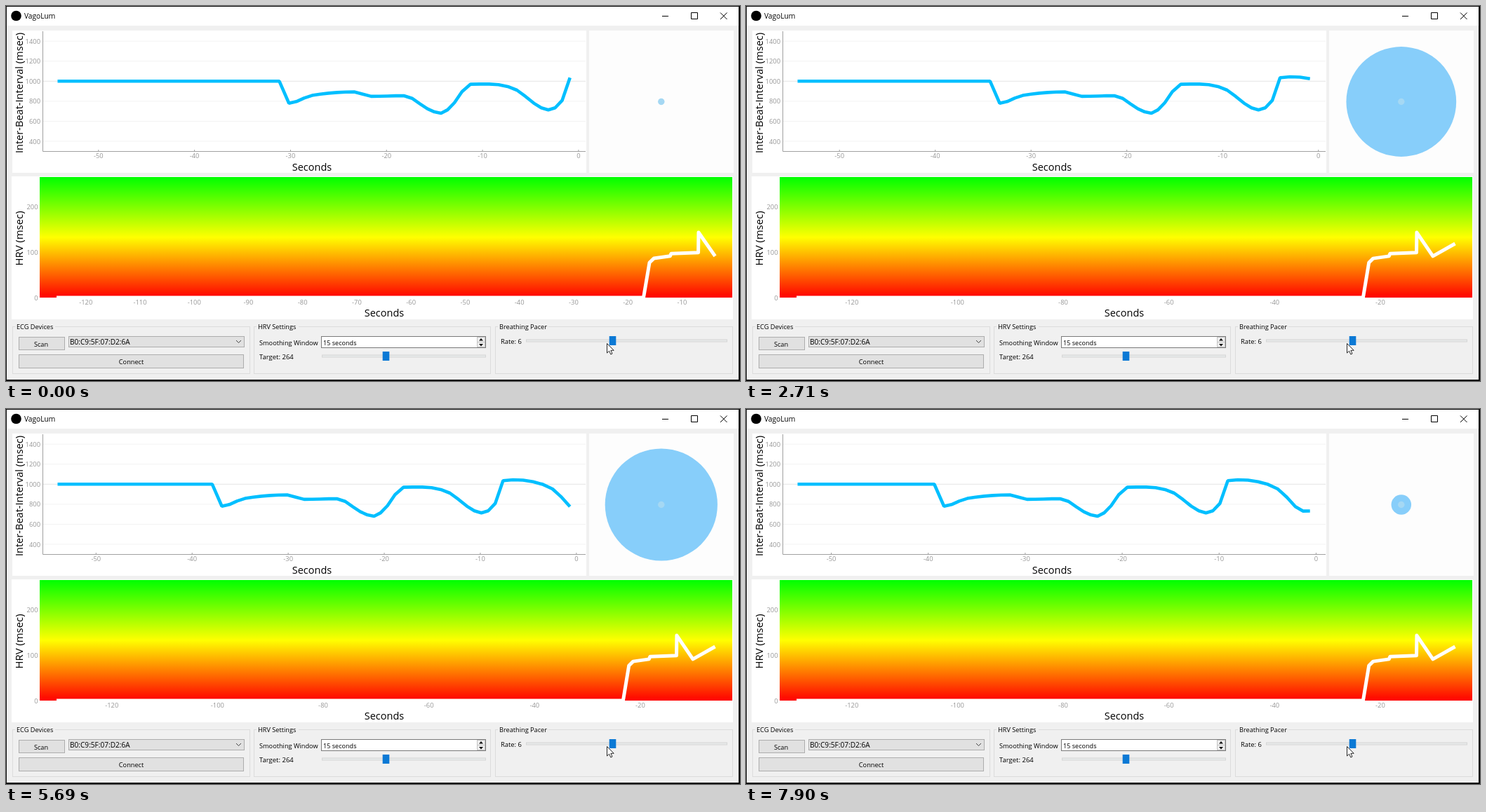
Write an HTML page that moves like this. It is 1046 px wide and 535 px high and loops after 8 s.

```html
<!DOCTYPE html>
<html lang="en">
<head>
<meta charset="utf-8">
<title>Breathing pacer</title>
<style>
  html, body { margin: 0; width: 100%; height: 100%; overflow: hidden; background: #000; }
  svg { display: block; width: 1046px; height: 535px; font-family: "Open Sans", "Noto Sans", sans-serif; }
  text { white-space: pre; }
</style>
</head>
<body>
<svg id="stage" viewBox="0 0 1046 535">
  <defs>
    <linearGradient id="zones" x1="0" y1="0" x2="0" y2="1">
      <stop offset="0" stop-color="#0f0"/>
      <stop offset=".5" stop-color="#ff0"/>
      <stop offset="1" stop-color="#f00"/>
    </linearGradient>
    <clipPath id="hrvClip"><rect x="48" y="244" width="987" height="172"/></clipPath>
  </defs>
</svg>
<script>
const stage = document.getElementById("stage");
const LOOP = 8000;

function add(tag, attrs, parent = stage) {
  const node = document.createElementNS("http://www.w3.org/2000/svg", tag);
  for (const key in attrs) node.setAttribute(key, attrs[key]);
  return parent.appendChild(node);
}
const rect = (x, y, width, height, fill, stroke = "none") =>
  add("rect", { x, y, width, height, fill, stroke });
const path = (d, stroke, width = 1, more = {}) =>
  add("path", { d, stroke, "stroke-width": width, fill: "none", ...more });
function label(str, x, y, size = 9.2, more = {}, parent = stage) {
  const node = add("text", { x, y, "font-size": size, fill: "#000", ...more }, parent);
  node.textContent = str;
  return node;
}
const middle = { "text-anchor": "middle" };
const tick = { fill: "#969696", "text-anchor": "middle" };
const tickEnd = { fill: "#969696", "text-anchor": "end" };
const polyline = points => "M" + points.map(p => p.join()).join("L");

const ibiY = ms => 107.3 + (1000 - ms) / 7;
const hrvY = ms => 416 - ms * 0.65;

function sideTitle(str, y, size) {
  label(str, 0, 0, size, { ...middle, transform: `translate(24 ${y}) rotate(-90)` });
}

function drawWindow() {
  rect(0, 0, 1046, 535, "#0c0c0c");
  rect(1, 1, 1043, 532, "#f0f0f0");
  rect(1, 1, 1043, 27, "#fff");
  add("circle", { cx: 14.5, cy: 14, r: 7.3, fill: "#000" });
  label("VagoLum", 26, 18, 10.2);
  path("M935 14.5H944M976.5 9.5H985.5V18.5H976.5ZM1018 9.5L1027.5 19M1027.5 9.5L1018 19", "#000");
  rect(9, 35, 818, 203, "#fff");
  rect(831, 35, 206, 203, "#fdfdfd");
  rect(8, 243, 1028, 204, "#fff");
}

function drawIbiFrame() {
  for (let ms = 400; ms <= 1400; ms += 200) {
    const y = ibiY(ms);
    path(`M52 ${y}H826`, ms === 1000 ? "#e4e4e4" : "#f3f3f3");
    label(ms, 49, y + 3.6, 9.4, tickEnd);
  }
  path("M52.5 36V207.5H826", "#a0a0a0");
  label("Seconds", 436, 235, 14.5, middle);
  sideTitle("Inter-Beat-Interval (msec)", 124, 14.6);
}

function drawHrvFrame() {
  rect(48, 244, 987, 172, "url(#zones)");
  for (let ms = 0; ms <= 200; ms += 100) label(ms, 45.5, hrvY(ms) + 3.5, 9.4, tickEnd);
  label("Seconds", 539, 443, 14.5, middle);
  sideTitle("HRV (msec)", 331.5, 14.9);
}

function group(title, x, right, titleWidth) {
  rect(x + .5, 457.5, right - x, 67, "none", "#dcdcdc");
  rect(x + 4, 455, titleWidth + 4, 6, "#f0f0f0");
  label(title, x + 6, 461.2);
}
function slider(x, right, y, handle) {
  rect(x + .5, y - 1.5, right - x, 3, "#e7eaea", "#d6d6d6");
  rect(handle - 4.8, y - 6.5, 9.6, 13, "#0b79d5");
}
function drawControls() {
  group("ECG Devices", 9, 347, 53);
  group("HRV Settings", 353, 690, 56);
  group("Breathing Pacer", 697, 1035, 68);

  rect(18.5, 472.5, 65, 18, "#e1e1e1", "#adadad");
  label("Scan", 50, 485.5, 9.2, middle);
  rect(89.5, 471.5, 250, 15, "#e1e1e1", "#adadad");
  label("B0:C9:5F:07:D2:6A", 91, 482.5, 10.1);
  path("M328 477L331.5 480.5L335 477", "#444");
  rect(18.5, 497.5, 320, 19, "#e1e1e1", "#adadad");
  label("Connect", 178.5, 511, 9.2, middle);

  label("Smoothing Window", 361, 484);
  rect(449.5, 471.5, 234, 16, "#fff", "#7a7a7a");
  rect(671.5, 472.5, 11, 7, "#f0f0f0", "#c4c4c4");
  rect(671.5, 479.5, 11, 7, "#f0f0f0", "#c4c4c4");
  add("path", { d: "M674 477.5H680L677 474ZM674 482H680L677 485.5Z", fill: "#111" });
  label("15 seconds", 452, 484, 9.1);
  label("Target: 264", 361, 504, 9.5);
  slider(450, 683, 499.5, 541.5);
  label("Rate: 6", 705, 482, 9.4);
  slider(741, 1027, 477.5, 864.5);
  add("path", {
    d: "M856.5 481.5V495L859.6 492.2L861.8 497L864 496L861.9 491.3H866.2Z",
    fill: "#fff", stroke: "#111", "stroke-width": .9
  });
}

drawWindow();
drawIbiFrame();
drawHrvFrame();

const ibiTicks = add("g", {});
const ibiLine = path("", "#00bfff", 4.6, { "stroke-linejoin": "bevel" });
const hrvTicks = add("g", {});
const hrvLine = path("", "#fff", 5, { "stroke-linejoin": "round", "clip-path": "url(#hrvClip)" });
const pacer = add("circle", { cx: 933.8, cy: 136.5, fill: "#87cefa" });
add("circle", { cx: 933.8, cy: 136.5, r: 4.7, fill: "#a5d8f3" });
drawControls();

// Heart rhythm: turning points as [beat, interval in ms], joined by a smooth curve.
const rhythm = [
  [0, 1000], [1, 780], [4, 858], [9, 893], [11, 849], [15, 855], [18, 725], [20, 680], [22, 785],
  [24, 970], [27, 965], [29, 911], [31, 781], [33, 713], [35, 809], [36, 1035], [37, 1044],
  [39, 1025], [41, 953], [44, 732], [45, 733]
];

// Slope at a key: flat at peaks, dips and ends.
function slope(i) {
  const [a, b, c] = [rhythm[i - 1], rhythm[i], rhythm[i + 1]];
  if (!a || !c || (b[1] - a[1]) * (c[1] - b[1]) <= 0) return 0;
  return (c[1] - a[1]) / (c[0] - a[0]);
}
function interval(beat) {
  const i = Math.max(1, rhythm.findIndex(key => key[0] >= beat));
  const [[b0, v0], [b1, v1]] = [rhythm[i - 1], rhythm[i]];
  const h = b1 - b0, u = (beat - b0) / h, w = 1 - u;
  return v0 * w * w * (1 + 2 * u) + v1 * u * u * (3 - 2 * u)
    + h * u * w * (slope(i - 1) * w - slope(i) * u);
}

// Each beat lies one previous interval after the one before it.
const beats = [];
for (let i = 0, time = 0; i <= 45; i++) {
  const ms = interval(i);
  beats.push({ time, ms });
  time += ms / 1000;
}

// The buffer drops one second of the flat start per beat and always fills the plot.
function showIbi(count) {
  const [left, right] = [73.5, 803.7];
  const shown = beats.slice(0, 37 + count);
  const last = shown[shown.length - 1];
  const flat = 23.1 - count;
  const scale = (right - left) / (flat + last.time);
  const points = shown.map(b => [left + (flat + b.time) * scale, ibiY(b.ms)]);
  ibiLine.setAttribute("d", polyline([[left, ibiY(1000)], ...points]));

  const zero = right + 0.00086 * last.ms * scale;
  ibiTicks.replaceChildren();
  for (let s = -50; s <= 0; s += 10) {
    const x = zero + s * scale;
    add("path", { d: `M${x} 205V208`, stroke: "#a0a0a0" }, ibiTicks);
    label(s, x, 216.7, 9.4, tick, ibiTicks);
  }
}

// HRV readings as [seconds after the rise, ms]; the last one arrives later.
const readings = [[0, 0], [1.1, 77], [1.9, 86], [4.9, 91], [5.1, 96.5], [10.1, 99], [10.15, 143],
  [13.2, 91], [17.4, 118.5]];

function showHrv(updated) {
  const [left, right] = [72, 1010.5];
  const shown = updated ? readings : readings.slice(0, -1);
  const flat = updated ? 107.2 : 108.3;
  const scale = (right - left) / (flat + shown[shown.length - 1][0]);
  const points = shown.map(([s, ms]) => [left + (flat + s) * scale, hrvY(ms)]);
  hrvLine.setAttribute("d", polyline([[left, hrvY(0)], ...points]));

  const zero = right + (updated ? 5.85 : 3.9) * scale;
  hrvTicks.replaceChildren();
  for (let s = -120; s < 0; s += updated ? 20 : 10)
    label(s, zero + s * scale, 425.7, 9.4, tick, hrvTicks);
}

const REFRESH = LOOP / 72;
let shownCount = -1;
function render(time) {
  const t = Math.floor(time / REFRESH) * REFRESH;
  pacer.setAttribute("r", 49.1 + 51.3 * Math.cos(2 * Math.PI * (t - 4200) / 10000));
  const count = Math.max(0, Math.min(9, Math.floor((t + 475) / 875)));
  if (count === shownCount) return;
  shownCount = count;
  showIbi(count);
  showHrv(count >= 2);
}

const start = performance.now();
function frame() {
  render((performance.now() - start) % LOOP);
  requestAnimationFrame(frame);
}
frame();
</script>
</body>
</html>
```
